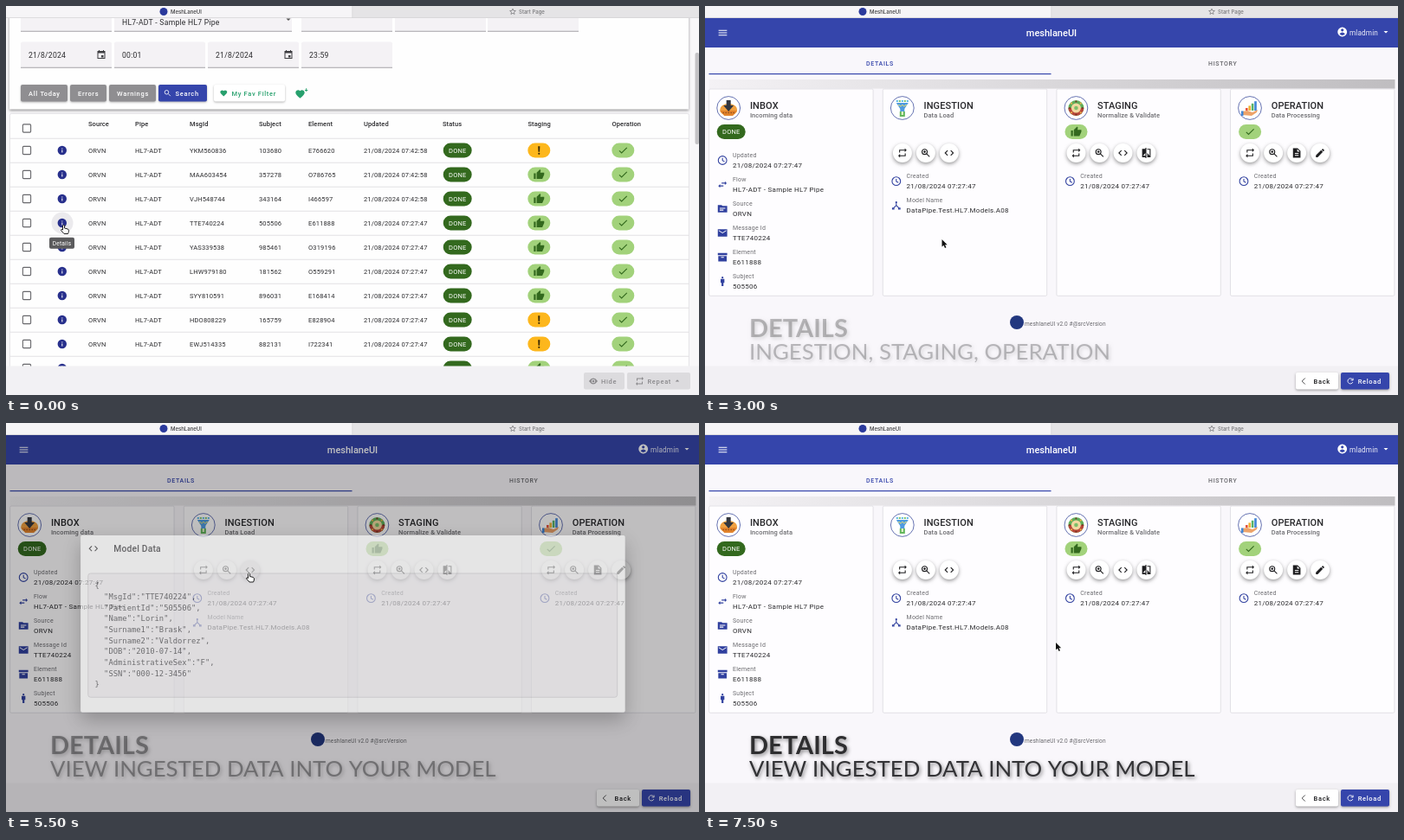
Write an HTML page with a canvas that moves like this. It is 800 px wide and 450 px high and loops after 8 s.

```html
<!DOCTYPE html>
<html lang="en">
<head>
<meta charset="utf-8">
<title>MeshLaneUI</title>
<style>
html, body { margin: 0; width: 100%; height: 100%; overflow: hidden; background: #f8f6fa; }
canvas { display: block; width: 800px; height: 450px; }
</style>
</head>
<body>
<canvas id="stage"></canvas>
<script>
const LOOP = 8000, TICK = 500;
const SANS = 'Roboto, sans-serif';
const BLUE = '#3545ab', NAVY = '#272f8c', INK = '#2b2b2e', GREY = '#6c6c70';
const GREEN = '#33691e', LIME = '#a2d27b', AMBER = '#fdb71c', TEAL = '#27a06d';

const dpr = window.devicePixelRatio || 1;

function setup(canvas) {
  canvas.width = 800 * dpr;
  canvas.height = 450 * dpr;
  const ctx = canvas.getContext('2d');
  ctx.scale(dpr, dpr);
  return ctx;
}

const main = setup(document.getElementById('stage'));
const layer = setup(document.createElement('canvas'));
let c = main;

// Icons on a 24 unit grid; entries starting with "~" are stroked.
const ICONS = {
  repeat: 'M7 7h10v3l4-4-4-4v3H5v6h2zM17 17H7v-3l-4 4 4 4v-3h12v-6h-2z',
  zoom: '~M15 9.5a5.5 5.5 0 1 1-11 0a5.5 5.5 0 1 1 11 0M14 14l6 6M7 9.5h5M9.5 7v5',
  search: '~M15 9.5a5.5 5.5 0 1 1-11 0a5.5 5.5 0 1 1 11 0M14 14l6 6',
  code: '~M8.7 6.7L3.4 12l5.3 5.3M15.3 6.7l5.3 5.3-5.3 5.3',
  compare: 'M3 3h7V1h2v22h-2v-2H3zM5 18h5v-6zM14 3h7v18h-7v-9l5 6V5h-5z',
  doc: 'M4 2h10l6 6v14H4zM13 3.5V9h5.5zM8 12v2h8v-2zM8 16v2h8v-2z',
  edit: 'M3 17.2V21h3.8L17.8 9.9l-3.7-3.7zM18.9 8.9l2.2-2.5-3.4-3.5-2.5 2.2z',
  clock: '~M21 12a9 9 0 1 1-18 0a9 9 0 1 1 18 0M12 7v5.5l4.5 2.5',
  swap: 'M7 11l-4 4 4 4v-3h7v-2H7zM21 9l-4-4v3h-7v2h7v3z',
  folder: 'M2 4h8l2 2h10v14H2zM6 10v2h12v-2zM6 14v2h8v-2z',
  mail: 'M2 4h20v16H2zM4 6v2l8 5 8-5V6l-8 5z',
  box: 'M2 3h20v5H2zM3 9.5h18V21H3zM9 11.5v2h6v-2z',
  man: 'M14 4a2 2 0 1 1-4 0a2 2 0 1 1 4 0M8 7h8v8h-2v7h-4v-7H8z',
  hub: '~M12 6v7M12 12l-6 6M12 12l6 6M13 5.5a1 1 0 1 1-2 0a1 1 0 1 1 2 0M4 17.5h3v2.5H4zM17 17.5h3v2.5h-3z',
  thumb: 'M1 9h4v12H1zM7 8l7-7 1.7 2-1 5H23v4l-4 9H7z',
  done: '~M4 12.5l5 5L20.3 6.3',
  alert: 'M10 3h4l-.6 12h-2.8zM14 19a2 2 0 1 1-4 0a2 2 0 1 1 4 0',
  info: 'M22 12a10 10 0 1 1-20 0a10 10 0 1 1 20 0M11 7v2h2V7zM11 11v6h2v-6z',
  heart: 'M12 21C5 15 2 12 2 8.5C2 3 9 1 12 5C15 1 22 3 22 8.5C22 12 19 15 12 21z',
  calendar: 'M3 3h3V1h2v2h8V1h2v2h3v18H3zM5 8v11h14V8zM12 13h5v5h-5z',
  user: 'M22 12a10 10 0 1 1-20 0a10 10 0 1 1 20 0M15 8a3 3 0 1 0-6 0a3 3 0 1 0 6 0M6 16q6 6.5 12 0q-6-6-12 0z',
  menu: 'M3 6h18v2H3zM3 11h18v2H3zM3 16h18v2H3z',
  refresh: '~M18.5 14.5a7 7 0 1 1-1.3-7.6L19 9M19 4v5.5h-5.5',
  back: '~M16.5 3L7.5 12l9 9',
  eye: 'M1 12q11-15 22 0q-11 15-22 0zM17 12a5 5 0 1 0-10 0a5 5 0 1 0 10 0M15 12a3 3 0 1 1-6 0a3 3 0 1 1 6 0',
  star: '~M12 3.5l2.5 6 6.5.5-5 4.3 1.5 6.2-5.5-3.3-5.5 3.3L8 14.3 3 10l6.5-.5z',
  down: 'M7 10h10l-5 5z',
  up: 'M7 14h10l-5-5z'
};

function icon(name, x, y, size, color) {
  const s = size / 24, d = ICONS[name];
  c.save();
  c.translate(x - size / 2, y - size / 2);
  c.scale(s, s);
  if (d[0] === '~') {
    c.strokeStyle = color;
    c.lineWidth = 2;
    c.stroke(new Path2D(d.slice(1)));
  } else {
    c.fillStyle = color;
    c.fill(new Path2D(d), 'evenodd');
  }
  c.restore();
}

// y is the middle of the capitals
function text(s, x, y, size, color = INK, o = {}) {
  c.font = `${o.weight || 400} ${size}px ${o.font || SANS}`;
  c.letterSpacing = (o.gap || 0) + 'px';
  c.textAlign = o.align || 'left';
  c.fillStyle = color;
  c.fillText(s, x, y + size * 0.357);
}

function rect(x, y, w, h, color) {
  c.fillStyle = color;
  c.fillRect(x, y, w, h);
}

function round(x, y, w, h, r, fill, line) {
  c.beginPath();
  c.roundRect(x, y, w, h, r);
  if (fill) { c.fillStyle = fill; c.fill(); }
  if (line) { c.strokeStyle = line; c.lineWidth = 0.8; c.stroke(); }
}

function disc(x, y, r, fill, line) {
  round(x - r, y - r, 2 * r, 2 * r, r, fill, line);
}

function shadowed(draw, blur = 4, dy = 1.5, alpha = 0.35) {
  c.save();
  c.shadowColor = `rgba(0,0,0,${alpha})`;
  c.shadowBlur = blur * dpr;
  c.shadowOffsetY = dy * dpr;
  draw();
  c.restore();
}

function poly(color, ...p) {
  c.beginPath();
  for (let i = 0; i < p.length; i += 2) c.lineTo(p[i], p[i + 1]);
  c.closePath();
  c.fillStyle = color;
  c.fill();
}

// Values from [time, ...numbers] keys, eased between neighbours
function along(keys, t) {
  const i = keys.findIndex(k => k[0] > t);
  if (i < 0) return keys[keys.length - 1].slice(1);
  if (i === 0) return keys[0].slice(1);
  const a = keys[i - 1], b = keys[i];
  const u = (t - a[0]) / (b[0] - a[0]), e = u * u * (3 - 2 * u);
  return a.slice(1).map((v, j) => v + (b[j + 1] - v) * e);
}

const button = { weight: 500, gap: 0.67 };

function doneChip(x, y) {
  round(x, y - 8.5, 33, 17, 8.5, GREEN);
  text('DONE', x + 16.6, y, 7.5, '#fff', { align: 'center', gap: 0.2 });
}

function pill(x, y, name) {
  round(x - 13, y - 8.5, 26, 17, 8.5, name === 'alert' ? AMBER : LIME);
  icon(name, x, y, 13, name === 'alert' ? '#3b2b05' : GREEN);
}

function tooltip(s, x, y, w) {
  round(x - w / 2, y - 6.5, w, 13, 2, '#5b5b5d');
  text(s, x, y, 6.6, '#fff', { align: 'center', gap: 0.2 });
}

function browserTabs() {
  rect(0, 0, 400, 14, '#f6f5f7');
  rect(400, 0, 400, 14, '#e5e4e6');
  rect(0, 13.3, 800, 0.7, '#d3d2d5');
  rect(399.5, 0, 0.7, 14, '#d0cfd2');
  disc(182, 6.5, 4.5, '#2b3a9c');
  const o = { font: 'Inter, sans-serif', weight: 500 };
  text('MeshLaneUI', 190, 6.7, 6, '#3a3a3c', o);
  icon('star', 585, 6.3, 9, '#77777a');
  text('Start Page', 592, 6.7, 6, '#77777a', o);
}

/* ---- search list ---- */

const ROWS = [
  'YKM560836 103680 E766620', 'MAA603454 357278 O786765', 'VJH548744 343164 I466597',
  'TTE740224 505506 E611888', 'YAS339538 985461 O319196', 'LHW979180 181562 O559291',
  'SYY810591 896031 E168414', 'HDO808229 165759 E828904', 'EWJ514335 882131 I722341',
  'KPD270418 640275 O415093'
];
const HEADS = { Source: 95, Pipe: 149, MsgId: 212, Subject: 292, Element: 349,
  Updated: 413, Status: 504, Staging: 602.5, Operation: 699.5 };

function field(x, y, w, h, s, cal) {
  round(x, y, w, h, [2, 2, 0, 0], '#f4f2f5');
  rect(x, y + h - 0.7, w, 0.8, '#929095');
  if (s) text(s, x + 9, y + h / 2, 8.6, INK, { gap: 0.25 });
  if (cal) icon('calendar', x + 93, y + h / 2, 12, '#3d3d40');
}

function checkbox(x, y) {
  round(x - 4.6, y - 4.6, 9.2, 9.2, 1, '#fff');
  c.strokeStyle = '#68686c';
  c.lineWidth = 1.1;
  c.stroke();
}

function filled(s, x, w, color, lead) {
  shadowed(() => round(x, 91, w, 19.5, 2, color), 2.5, 1, 0.3);
  if (lead) icon(lead, x + 10.5, 100.8, 10, '#fff');
  text(s, x + (lead ? 19.5 : 9), 101, 7.5, '#fff', button);
}

function filterPanel() {
  shadowed(() => rect(4, 0, 784, 119.5, '#fefefe'), 3, 1, 0.4);
  [[17, 105], [125, 205], [341, 105], [449, 105], [556, 105]]
    .forEach(([x, w]) => field(x, 0, w, 29.5));
  text('HL7-ADT - Sample HL7 Pipe', 134, 18.5, 8.6, INK, { gap: 0.25 });
  icon('down', 326, 15.5, 12, '#555');
  field(17, 41.5, 105, 30, '21/8/2024', true);
  field(125, 41.5, 105, 30, '00:01');
  field(233, 41.5, 105, 30, '21/8/2024', true);
  field(341, 41.5, 105, 30, '23:59');
  filled('All Today', 17, 54, '#8f8e91');
  filled('Errors', 74, 42, '#8f8e91');
  filled('Warnings', 119, 54, '#8f8e91');
  filled('Search', 176, 56, BLUE, 'search');
  shadowed(() => round(240, 91, 82, 19.5, 2, '#fff'), 2.5, 1, 0.3);
  icon('heart', 251.3, 101, 9.5, TEAL);
  text('My Fav Filter', 260.5, 101, 7.5, TEAL, button);
  icon('heart', 339.5, 102, 12.5, TEAL);
  text('+', 344.8, 97.5, 7, TEAL, { weight: 700 });
}

function listPage() {
  rect(0, 0, 800, 450, '#f8f7f9');
  filterPanel();
  round(4.4, 124.4, 784, 310, 2, '#fefefe', '#dfdee1');
  checkbox(24, 141.5);
  for (const h in HEADS) text(h, HEADS[h], 136, 7.5, INK, { weight: 500, gap: 0.08 });
  ROWS.forEach((row, i) => {
    const y = 167 + i * 28, [id, subject, element] = row.split(' ');
    const put = (s, x) => text(s, x, y + 0.3, 7.5, INK, { gap: 0.15 });
    rect(4.8, y - 14.2, 783.4, 0.8, '#dcdbde');
    checkbox(24, y);
    if (i === 3) disc(65, y, 12.5, '#ebeaed');
    icon('info', 64.8, y, 12.5, NAVY);
    put('ORVN', 95);
    put('HL7-ADT', 149);
    put(id, 212);
    put(subject, 292);
    put(element, 349);
    put('21/08/2024 07:' + (i < 3 ? '42:58' : '27:47'), 413);
    doneChip(504.7, y);
    pill(615.3, y, [0, 7, 8].includes(i) ? 'alert' : 'thumb');
    pill(712.3, y, 'done');
  });
  tooltip('Details', 64.5, 274.3, 29);
  round(795.5, 54, 4.5, 106, 2, '#c3c2c5');
  rect(0, 416.5, 800, 33.5, '#f2f1f4');
  round(667, 424, 47, 19.5, 2, '#dcdbde');
  icon('eye', 678, 434, 11, '#8a898c');
  text('Hide', 687, 434, 7.5, '#8a898c', button);
  round(717, 424, 73, 19.5, 2, '#dcdbde');
  icon('repeat', 731.5, 434, 12, '#8a898c');
  text('Repeat', 740.5, 434, 7.5, '#8a898c', button);
  icon('up', 775, 433.5, 11, '#8a898c');
}

/* ---- details page ---- */

const art = {
  INBOX() {
    c.beginPath();
    c.ellipse(0, 2, 10, 7, 0, 0, 7);
    c.fillStyle = '#f0a040';
    c.fill();
    poly('#e2832c', -10, 3, 10, 3, 5, 9, -5, 9);
    poly('#34373f', -2.5, -9, 2.5, -9, 2.5, -3, 6, -3, 0, 4, -6, -3, -2.5, -3);
    for (let i = -2; i < 3; i++) disc(i * 3, 5.5, 0.8, '#8c4a1c');
  },
  INGESTION() {
    poly('#4f9be0', -7, -6, 7, -6, 2.5, 1, 2.5, 8, -2.5, 8, -2.5, 1);
    for (let i = -2; i < 3; i++) {
      rect(i * 3 - 1, -9, 2, 2, i % 2 ? '#7cc46a' : '#58b7e8');
      rect(i * 2 - 0.6, -4 + (i & 1), 1.4, 1.4, '#f4e36a');
    }
    rect(-3, 4, 6, 6, '#63b75c');
    rect(-1, 4, 2, 4, '#e9f5d0');
  },
  STAGING() {
    disc(0, 0, 9, '#5fae5a');
    c.beginPath();
    c.arc(0, 0, 9, 0, Math.PI);
    c.fillStyle = '#b8463a';
    c.fill();
    disc(0, 0, 5.5, '#f1d9a0');
    for (let i = 0; i < 8; i++)
      disc(7.5 * Math.cos(i * 0.785), 7.5 * Math.sin(i * 0.785), 1.1, i % 2 ? '#e9b04a' : '#7a3a28');
    disc(0, 0, 2.3, '#7cbf6a');
  },
  OPERATION() {
    ['#e5533d', '#f2b233', '#58b368', '#3f86d8'].forEach((k, i) =>
      rect(-5 + i * 3.4, -i * 2.6, 2.6, 3 + i * 2.6, k));
    poly('#eda36a', -9, 4, -3, 3, 3, 5, 9, 2, 8, 5, 2, 9, -9, 8);
    rect(-10, 3.5, 2.5, 5.5, '#3f86d8');
  }
};

const STAMP = '21/08/2024 07:27:47';
const CREATED = ['clock', 'Created', STAMP];
const CARDS = [
  { name: 'INBOX', sub: 'Incoming data', top: 178.5, tools: [], facts: [
    ['clock', 'Updated', STAMP], ['swap', 'Flow', 'HL7-ADT - Sample HL7 Pipe'],
    ['folder', 'Source', 'ORVN'], ['mail', 'Message Id', 'TTE740224'],
    ['box', 'Element', 'E611888'], ['man', 'Subject', '505506']] },
  { name: 'INGESTION', sub: 'Data Load', top: 202.7, tools: ['repeat', 'zoom', 'code'],
    facts: [CREATED, ['hub', 'Model Name', 'DataPipe.Test.HL7.Models.A08']] },
  { name: 'STAGING', sub: 'Normalize & Validate', top: 202.7, mark: 'thumb',
    tools: ['repeat', 'zoom', 'code', 'compare'], facts: [CREATED] },
  { name: 'OPERATION', sub: 'Data Processing', top: 202.7, mark: 'done',
    tools: ['repeat', 'zoom', 'doc', 'edit'], facts: [CREATED] }
];

function card(k, i, hover) {
  const x = 4.7 + i * 200.6;
  round(x, 96, 189.4, 239.3, 1.5, '#fefdff', '#dcdbe0');
  disc(x + 22.5, 118, 13.4, '#fff', '#40509f');
  c.save();
  c.translate(x + 22.5, 118);
  art[k.name]();
  c.restore();
  text(k.name, x + 47.2, 115.3, 11, '#29292c', { weight: 500, gap: 0.1 });
  text(k.sub, x + 47.2, 126.4, 7.5, GREY, { weight: 500, gap: 0.08 });
  if (i === 0) doneChip(x + 9, 145.5);
  if (k.mark) pill(x + 22.6, 145.5, k.mark);
  k.tools.forEach((name, j) => {
    const bx = x + 22.6 + j * 27;
    const over = hover && i === 1 && name === 'code';
    shadowed(() => disc(bx, 170, 11, over ? '#e6e5e8' : '#fff'), 4.5, 1.8, 0.4);
    icon(name, bx, 170, 13, '#1d1d1f');
  });
  k.facts.forEach(([sign, label, value], j) => {
    const y = k.top + j * 28;
    icon(sign, x + 15.5, y, 13, '#30409f');
    text(label, x + 27.3, y - 6.3, 7, GREY, { gap: 0.2 });
    text(value, x + 27.3, y + 5.7, 8, INK, { gap: 0.25 });
  });
}

function footerButtons() {
  shadowed(() => round(682, 424, 49, 19.5, 2, '#fff'), 3, 1.2, 0.35);
  icon('back', 691, 434, 9.5, '#1d1d1f');
  text('Back', 702.5, 434, 7.5, '#1d1d1f', button);
  shadowed(() => round(734, 424, 56, 19.5, 2, BLUE), 3, 1.2, 0.35);
  icon('refresh', 745, 434, 10.5, '#fff');
  text('Reload', 753.7, 434, 7.5, '#fff', button);
}

function detailsPage(hover) {
  rect(0, 0, 800, 450, '#f9f7fb');
  rect(0, 14, 800, 34, BLUE);
  icon('menu', 20.5, 31, 13, '#fff');
  text('meshlaneUI', 400, 31, 11, '#fff', { weight: 500, align: 'center' });
  icon('user', 735.7, 30, 13, '#fff');
  text('mladmin', 744, 31, 8.2, '#e9eaf6', { gap: 0.15 });
  icon('down', 786, 30, 12, '#fff');
  const tab = { weight: 500, gap: 0.67, align: 'center' };
  text('DETAILS', 202, 66.5, 7, BLUE, tab);
  text('HISTORY', 597.7, 66.5, 7, '#66666a', tab);
  rect(4.5, 78, 395, 1.2, BLUE);
  const g = c.createLinearGradient(4, 0, 796, 0);
  g.addColorStop(0, '#f4f2f5');
  g.addColorStop(1, '#bfbdc0');
  rect(4.5, 85, 792, 10.6, g);
  CARDS.forEach((k, i) => card(k, i, hover));
  disc(360, 366, 8, '#22377f');
  text('meshlaneUI v2.0 #@srcVersion', 369, 367.5, 6.5, '#68686c', { gap: 0.12 });
  rect(0, 416.5, 800, 33.5, '#f2f0f4');
  footerButtons();
}

const MODEL = ['{', '  "MsgId":"TTE740224",', '  "PatientId":"505506",', '  "Name":"Lorin",',
  '  "Surname1":"Brask",', '  "Surname2":"Valdorrez",', '  "DOB":"2010-07-14",',
  '  "AdministrativeSex":"F",', '  "SSN":"000-12-3456"', '}'];

function dialogBox() {
  shadowed(() => round(79.7, 127.8, 641.4, 209, 2, '#fff'), 22, 9, 0.4);
  icon('code', 94.7, 143.5, 13, '#1d1d1f');
  text('Model Data', 118.6, 143.7, 10.5, INK, { weight: 500, gap: 0.2 });
  round(88.5, 172.8, 623.4, 146.2, 3, '#f3f1f4', '#c9c8cb');
  MODEL.forEach((s, i) =>
    text(s, 96.4, 187.2 + i * 12.95, 9, '#38383b', { font: '"DejaVu Sans Mono", monospace' }));
}

// Painted on its own layer so that it fades as one piece
function dialog(alpha, scale) {
  c = layer;
  c.clearRect(0, 0, 800, 450);
  c.save();
  c.translate(400.4, 232.3);
  c.scale(scale, scale);
  c.translate(-400.4, -232.3);
  dialogBox();
  c.restore();
  c = main;
  c.save();
  c.globalAlpha = alpha;
  c.drawImage(layer.canvas, 0, 0, 800, 450);
  c.restore();
}

function caption(line, alpha) {
  if (alpha <= 0) return;
  c.save();
  c.globalAlpha = alpha;
  c.shadowColor = 'rgba(0,0,0,.45)';
  c.shadowBlur = 4 * dpr;
  c.shadowOffsetX = 1.5 * dpr;
  c.shadowOffsetY = 2 * dpr;
  text('DETAILS', 51, 372.6, 29, '#2e2e30', { font: 'Lato, sans-serif', weight: 700 });
  text(line, 51, 399.8, 25.8, '#333336', { font: 'Lato, sans-serif', weight: 400 });
  c.restore();
}

function cursor(x, y, hand) {
  const p = new Path2D(hand
    ? 'M-1 1q1-2 2 0v3l4 1q1.5 1 .8 3.5l-.8 2h-4.500l-3.500-4q0-2 2-.5z'
    : 'M0 0v8.6l2-1.800 1.500 3.200 1.500-.7-1.500-3.100h2.700z');
  c.save();
  c.translate(x, y);
  c.lineJoin = 'round';
  c.lineWidth = hand ? 1 : 1.4;
  c.strokeStyle = hand ? '#222' : '#fff';
  c.fillStyle = hand ? '#fff' : '#111';
  if (hand) c.fill(p);
  c.stroke(p);
  if (!hand) c.fill(p);
  c.restore();
}

const POINTER = [[0, 66.5, 253], [500, 110, 258], [1500, 269.5, 272], [3000, 273.5, 270],
  [3500, 275, 260], [4500, 280.5, 173.5], [5500, 280.5, 173.5], [6000, 223, 239.5], [7500, 405, 254]];
const FIRST = [[500, 0], [1500, 1], [2500, 1], [3000, 0.3], [3500, 0]];
const SECOND = [[5000, 0], [5500, 0.5], [6000, 1]];
const POPUP = [[5000, 0, 0.7, 0], [5500, 0.6, 0.98, 0.25], [6000, 1, 1, 0.32]];

function draw(t) {
  const hover = t >= 4500 && t < 6000;
  if (t < 500) listPage();
  else {
    detailsPage(hover);
    if (hover && t < 5500) tooltip('Model Data', 281.5, 190.6, 43);
    if (t >= 5500 && t < 7500) {
      const [alpha, scale, dim] = along(POPUP, t);
      rect(0, 14, 800, 436, `rgba(0,0,0,${dim})`);
      dialog(alpha, scale);
    }
    caption('INGESTION, STAGING, OPERATION', along(FIRST, t)[0]);
    caption('VIEW INGESTED DATA INTO YOUR MODEL', along(SECOND, t)[0]);
  }
  browserTabs();
  const [x, y] = along(POINTER, t);
  cursor(x, y, t < 500 || hover);
}

const start = performance.now();
let shown = -1;
function frame() {
  const t = Math.floor(((performance.now() - start) % LOOP) / TICK) * TICK;
  if (t !== shown) draw(shown = t);
  requestAnimationFrame(frame);
}
frame();
</script>
</body>
</html>
```
